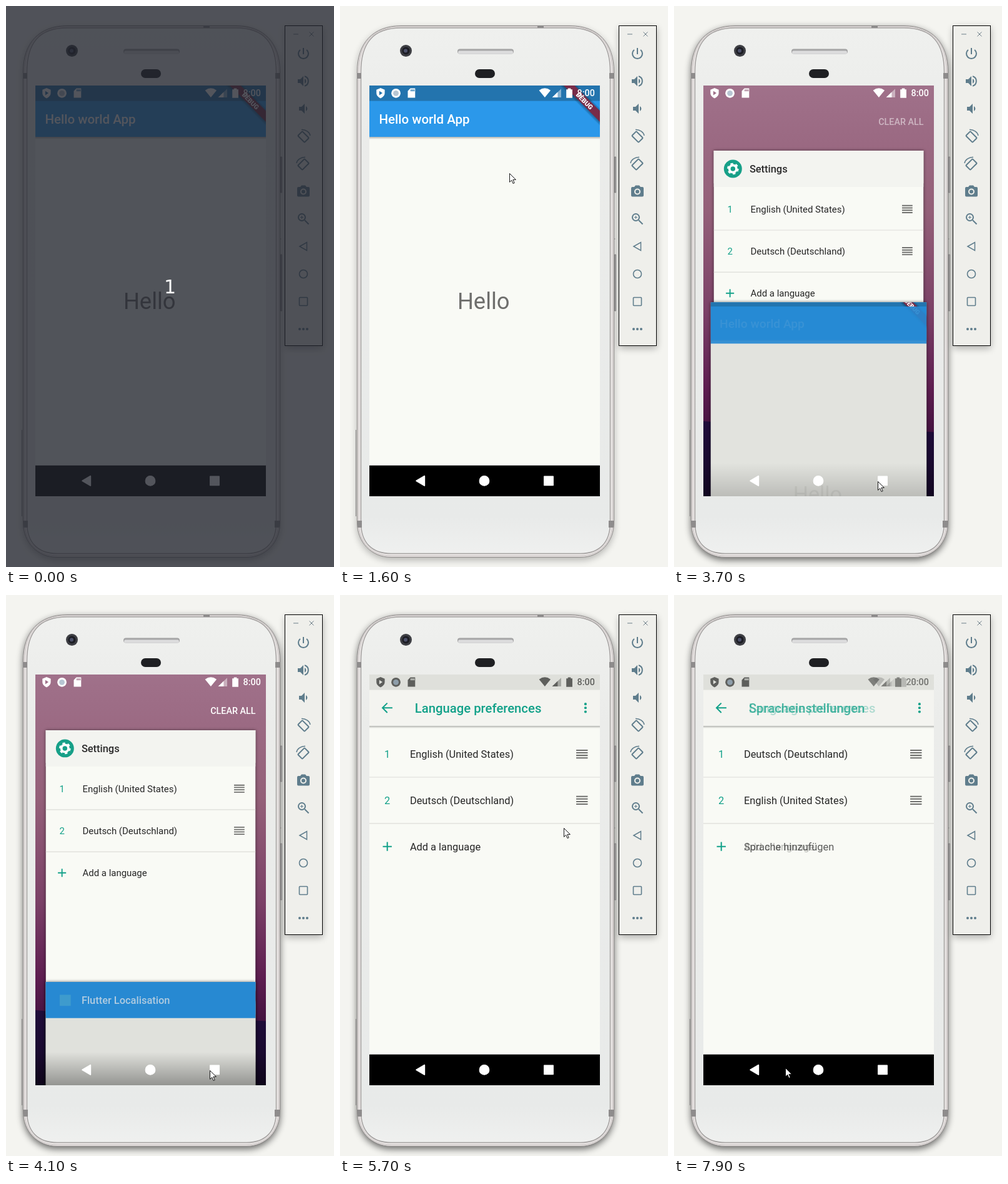
Recreate the animation shown at these times as an HTML page. Size 525 by 896 pixels, loop 8 s.

```html
<!DOCTYPE html>
<html lang="en">
<head>
<meta charset="utf-8">
<title>Hello world App</title>
<style>
  html, body { margin: 0; width: 100%; height: 100%; overflow: hidden; background: #f4f4f0; }
  svg { display: block; }
  text { font-family: Roboto, "Noto Sans", sans-serif; }
  .line { fill: none; stroke-width: 2; }
  .medium { font-weight: 500; }
  .teal { fill: #12a189; }
  .title { font-size: 19.8px; }
  .row { font-size: 16px; fill: #262626; }
  .row .num { fill: #12a189; text-anchor: middle; }
  .card-title { font-size: 17.6px; font-weight: 500; }
</style>
</head>
<body>
<svg width="525" height="896" viewBox="0 0 525 896">
  <defs>
    <filter id="blur3" x="-20%" y="-20%" width="140%" height="140%"><feGaussianBlur stdDeviation="3"/></filter>
    <filter id="blur6" x="-30%" y="-10%" width="160%" height="120%"><feGaussianBlur stdDeviation="6"/></filter>
    <linearGradient id="face" x2="0" y2="1">
      <stop stop-color="#eff0ee"/><stop offset=".2" stop-color="#ebecea"/>
      <stop offset=".93" stop-color="#e8eae9"/><stop offset="1" stop-color="#eff0ef"/>
    </linearGradient>
    <linearGradient id="sky" x2="0" y2="1">
      <stop stop-color="#a0718a"/><stop offset=".3" stop-color="#946079"/>
      <stop offset=".55" stop-color="#7b4167"/><stop offset=".74" stop-color="#5d1d50"/>
      <stop offset=".85" stop-color="#43123f"/>
    </linearGradient>
    <linearGradient id="hill" x2="0" y2="1">
      <stop stop-color="#1f0c3b"/><stop offset="1" stop-color="#150827"/>
    </linearGradient>
    <linearGradient id="fade" x2="0" y2="1">
      <stop stop-opacity="0"/><stop offset="1" stop-opacity=".34"/>
    </linearGradient>
    <linearGradient id="drop" x2="0" y2="1">
      <stop stop-opacity=".28"/><stop offset="1" stop-opacity="0"/>
    </linearGradient>
    <clipPath id="screenClip"><rect width="360" height="640"/></clipPath>
    <clipPath id="helloClip"><rect id="helloCut" width="360" height="640"/></clipPath>
    <clipPath id="prefsClip"><rect id="prefsCut" width="360" height="640"/></clipPath>
    <g id="handle" fill="#727270">
      <path d="M323-7h18v2h-18zM323-3h18v2h-18zM323 1h18v2h-18zM323 5h18v2h-18z"/>
    </g>
    <g id="radio">
      <path d="M265 7.500q9-6.500 18 0L274 18.500z"/>
      <path d="M285.500 18.500L299.500 5v13.500z" opacity=".45"/>
      <path d="M285.500 18.500L294 10.300v8.200z"/>
      <path d="M307.500 6.200h2.500v-1.700h4.500v1.700h2.500v13h-9.500z"/>
    </g>
  </defs>

  <rect width="525" height="896" fill="#f4f4f0"/>

  <!-- phone -->
  <path class="shell" data-inset="0" id="shade" transform="translate(0 4)" filter="url(#blur6)"/>
  <g fill="#c9c7c6" stroke="#8c8a89">
    <path d="M25.500 677V815M439.500 241h2v57h-2zM439.500 397h2v90h-2z" fill="#aaa" stroke="#858383"/>
    <path d="M438.500 372h2M438.500 797v18"/>
    <path class="shell" data-inset="0" fill="#e5e0df" stroke="#8d8a89"/>
    <path class="shell" data-inset="2.500" fill="#ece8e7" stroke="#c6c1c0"/>
    <path class="shell" data-inset="6" fill="url(#face)" stroke="#a5a2a1" stroke-width="1.500"/>
  </g>
  <path d="M27 107h7v9h-7zM431 107h8v9h-8zM28 822h7v11h-7zM430 822h8v11h-8zM316 31h10v4h-10z" fill="#8e8c8c"/>
  <circle cx="105.500" cy="71.500" r="9.500" fill="#3d3e43"/>
  <circle cx="105.500" cy="71.500" r="6" fill="#1c1d24"/>
  <circle cx="105" cy="71.500" r="3" fill="#4c5068"/>
  <rect x="188" y="68.500" width="90" height="8" rx="4" fill="#a5a5a6"/>
  <rect x="189" y="71.500" width="88" height="5" rx="2.500" fill="#dcdcdd"/>
  <rect x="216" y="101" width="32" height="14" rx="7" fill="#1f2023"/>

  <!-- screen, drawn on a 360 x 640 grid -->
  <g transform="translate(47 127) scale(1.025)"><g clip-path="url(#screenClip)">
    <rect width="360" height="640" fill="url(#sky)"/>
    <path d="M0 523l60 5 120 24 130-15 50 3v100H0z" fill="url(#hill)"/>
    <text id="clear" class="medium" x="344" y="61" text-anchor="end" font-size="14" fill="#fff">CLEAR ALL</text>

    <g id="prefs">
      <rect id="prefsShade" width="360" height="640" opacity=".5" filter="url(#blur3)"/>
      <g clip-path="url(#prefsClip)">
        <rect width="360" height="640" fill="#f9faf5"/>
        <g class="row" id="english">
          <text class="num" x="28" y="5.800" id="englishNum">1</text>
          <text x="63.300" y="5.800">English (United States)</text>
          <use href="#handle"/>
          <path d="M0 36h360" stroke="#deded9" stroke-width="1.200"/>
        </g>
        <g class="row" transform="translate(0 268)">
          <path d="M21 0h14M28-7v14" class="line" stroke="#12a189"/>
          <text x="63.300" y="5.800" id="addEn">Add a language</text>
          <text x="63.300" y="5.800" id="addDe">Sprache hinzufügen</text>
        </g>
        <g class="row" id="deutsch">
          <g id="lift">
            <rect y="-35" width="360" height="73" opacity=".36" filter="url(#blur3)"/>
            <rect y="-36" width="360" height="72" fill="#f9faf5"/>
          </g>
          <text class="num" x="28" y="5.800" id="deutschNum">2</text>
          <text x="63.300" y="5.800">Deutsch (Deutschland)</text>
          <use href="#handle"/>
          <path d="M0 36h360" stroke="#deded9" stroke-width="1.200"/>
        </g>
        <rect y="80" width="360" height="4" fill="url(#drop)"/>
        <rect width="360" height="80" fill="#f4f4f0"/>
        <rect width="360" height="24" fill="#dfe0db"/>
        <path d="M36 52H21M28 44.500L20.500 52 28 59.500" class="line" stroke="#12a189"/>
        <g class="teal">
          <circle cx="337.500" cy="46" r="2"/><circle cx="337.500" cy="52" r="2"/><circle cx="337.500" cy="58" r="2"/>
          <text class="title medium" x="71" y="59.500" id="titleEn">Language preferences</text>
          <text class="title medium" x="71" y="59.500" id="titleDe">Spracheinstellungen</text>
        </g>
        <rect y="592" width="360" height="48"/>
        <g id="prefsHead">
          <rect y="24" width="360" height="62" fill="#f3f4f0"/>
          <circle cx="33" cy="55" r="15.500" fill="#17a088"/>
          <g transform="translate(33 55)" fill="none" stroke="#fff">
            <circle r="6" stroke-width="4"/>
            <circle r="8.700" stroke-width="2.600" stroke-dasharray="4.555"/>
          </g>
          <text class="card-title" x="61.500" y="62" fill="#2c2c2c">Settings</text>
        </g>
      </g>
    </g>

    <g id="hello">
      <rect id="helloShade" width="360" height="640" opacity=".55" filter="url(#blur3)"/>
      <g clip-path="url(#helloClip)">
        <rect width="360" height="640" fill="#f9faf5"/>
        <rect y="80" width="360" height="4" fill="url(#drop)"/>
        <rect width="360" height="80" fill="#2b98ea"/>
        <rect width="360" height="24" fill="#2374ae"/>
        <text class="medium" x="15" y="59.500" font-size="20" fill="#fff">Hello world App</text>
        <text x="178.300" y="348.300" font-size="35.500" text-anchor="middle" fill="#6e6e6c">Hello</text>
        <g transform="translate(360 0) rotate(45)">
          <rect x="-48" y="28" width="96" height="13" opacity=".5" filter="url(#blur3)"/>
          <rect x="-48" y="28" width="96" height="12" fill="#782c49"/>
          <text y="37.700" font-size="10.200" font-weight="900" text-anchor="middle" fill="#fff">DEBUG</text>
        </g>
        <rect y="592" width="360" height="48"/>
        <g id="helloHead">
          <rect y="24" width="360" height="62" fill="#2b98ea"/>
          <rect y="86" width="360" height="554" fill="#f9faf5"/>
          <g id="helloLabel">
            <rect x="24" y="46" width="19" height="19" fill="#4fb6e3"/>
            <text class="card-title" x="61.500" y="62" fill="#fff">Flutter Localisation</text>
          </g>
          <rect y="24" width="360" height="616" opacity=".1"/>
        </g>
      </g>
    </g>

    <rect id="scrim" y="588" width="360" height="52" fill="url(#fade)"/>
    <g id="status">
      <path d="M17.500 4l6.500 2.500v5c0 4-3 7-6.500 8.500C14 18.500 11 15.500 11 11.500v-5zM15.500 8.500v6.500l5-3.200z" fill-rule="evenodd"/>
      <circle cx="41.500" cy="12" r="7.200"/>
      <circle cx="41.500" cy="12" r="4.300" fill="#9fb3c4" opacity=".75"/>
      <path d="M64 4.500h7.500v14.500h-11.500v-10.500zM64.500 6v3h1.400v-3zM66.800 6v3h1.400v-3zM69 6v3h1.400v-3z" fill-rule="evenodd"/>
      <use id="radioOld" href="#radio"/>
      <use id="radioNew" href="#radio" x="-8"/>
      <g class="medium" font-size="14" text-anchor="end">
        <text id="clockOld" x="352" y="17">8:00</text>
        <text id="clockNew" x="352" y="17">20:00</text>
      </g>
    </g>
    <g fill="#fff" stroke="#fff" stroke-linejoin="round">
      <path d="M73.500 616l12.500-7.300v14.600z" stroke-width="2"/>
      <circle cx="179.500" cy="616" r="7.700"/>
      <rect x="273" y="609" width="14" height="14" stroke-width="1.500"/>
    </g>
  </g></g>

  <!-- emulator tool panel -->
  <rect x="447" y="35" width="60" height="512" opacity=".28" filter="url(#blur6)"/>
  <rect x="446.500" y="31.500" width="60" height="511" fill="#efefeb" stroke="#000"/>
  <path d="M460 45h8M485.500 41.500l7 7M492.500 41.500l-7 7" stroke="#6d7e88" fill="none"/>
  <g id="tools" fill="#5f7d8c" stroke="#5f7d8c" stroke-width="0">
    <g><path class="line" d="M0-9v10M-5.100-6.100a8 8 0 1 0 10.200 0"/></g>
    <g><path d="M-9-3v6h4l5 5V-8l-5 5zM2-4v8a4.500 4.500 0 0 0 0-8z"/><path class="line" d="M2-7.700a8 8 0 0 1 0 15.400"/></g>
    <g><path d="M-7-3v6h4l5 5V-8l-5 5zM4-4v8a4.500 4.500 0 0 0 0-8z"/></g>
    <g><g id="turn"><rect class="line" x="-7.500" y="-5" width="15" height="10" rx="1" transform="translate(0 1) rotate(45)"/><path class="line" d="M-3-10.500C4-11 10-6 11-1" style="stroke-width:1.500"/></g></g>
    <g><use href="#turn" transform="scale(-1 1)"/></g>
    <g><path d="M-8-7h3l2-2.500h6l2 2.500h3a2 2 0 0 1 2 2v11.500a2 2 0 0 1-2 2H-8a2 2 0 0 1-2-2V-5a2 2 0 0 1 2-2z"/><circle class="line" cy=".5" r="4" stroke="#efefeb"/></g>
    <g><circle class="line" cx="-2.500" cy="-2.500" r="5.500"/><path class="line" d="M2 2l6.500 6.500"/><path class="line" d="M-5-2.500h5M-2.500-5v5" style="stroke-width:1"/></g>
    <g><path class="line" d="M-6 0L5.500-6.500v13z" style="stroke-width:1.500"/></g>
    <g><circle class="line" r="6.500" style="stroke-width:1.600"/></g>
    <g><rect class="line" x="-6.500" y="-6.500" width="13" height="13" rx="1" style="stroke-width:1.600"/></g>
    <g><circle cx="-6" r="2"/><circle r="2"/><circle cx="6" r="2"/></g>
  </g>

  <path id="cursor" d="M.5.500V14.300l3.200-3.100 2.300 5.300 2.200-.9-2.300-5.200h4.500z" fill="#fff" stroke="#000" stroke-width=".9"/>

  <g id="countdown">
    <rect width="525" height="896" fill="#23262f" opacity=".78"/>
    <text x="262.500" y="459" text-anchor="middle" font-size="30" fill="#fff" style="font-family:'DejaVu Sans',sans-serif">1</text>
  </g>
</svg>

<script>
const LOOP = 8000, STEP = 100;
const $ = id => document.getElementById(id);
const set = (id, name, value) => $(id).setAttribute(name, value);
const alpha = (id, value) => set(id, "opacity", value);

// Piecewise linear value through [time, value] points
function track(t, points) {
  if (t <= points[0][0]) return points[0][1];
  for (let i = 1; i < points.length; i++) {
    const [t0, a] = points[i - 1], [t1, b] = points[i];
    if (t < t1) return a + (b - a) * (t - t0) / (t1 - t0);
  }
  return points[points.length - 1][1];
}

// Phone outline, moved inwards by i pixels
function shell(i) {
  const l = 27.5 + i, r = 438.5 - i, t = 31.5 + i * .6, b = 880.5 - i;
  return `M${l} 105C${l} 60 52 ${t} 98 ${t}H368C414 ${t} ${r} 60 ${r} 105` +
    `V825C${r} 856 416 ${b} 385 ${b}H82C50 ${b} ${l} 856 ${l} 825Z`;
}

// Window between its card (open = 0) and full screen (open = 1)
function placeWindow(id, open, cardTop) {
  const scale = .9106 + .0894 * open, cut = 24 * (1 - open);
  const x = 180 * (1 - scale), y = cardTop * (1 - open) - scale * cut;
  set(id, "transform", `translate(${x} ${y}) scale(${scale})`);
  set(id + "Cut", "y", cut);
  set(id + "Shade", "y", cut);
}

const pointer = [
  [900, 164, 5], [1100, 205, 95], [1250, 262, 205], [1400, 285, 253], [1500, 285, 253],
  [1700, 256, 280], [2000, 256, 280], [2200, 210, 370], [2400, 167, 510], [2600, 235, 670],
  [2800, 326, 759], [4200, 326, 759], [4450, 318, 610], [4700, 293, 453], [5300, 293, 453],
  [5600, 345, 390], [5900, 383, 335], [6000, 384, 324], [6100, 384, 324], [6500, 380, 264],
  [6800, 377, 250], [7200, 377, 250], [7500, 300, 450], [7900, 178, 755]
];
const helloOpen = [[3300, 1], [3400, .96], [3600, .45], [3800, .14], [4100, 0]];
const prefsOpen = [[5000, 0], [5100, .53], [5200, .8], [5300, .92], [5500, 1]];

function render(t) {
  const recents = t >= 3400 && t < 5100;
  alpha("countdown", t < 500 ? 1 : 0);
  alpha("shade", t < 3200 ? .28 : .6);

  alpha("cursor", t < 900 ? 0 : 1);
  const x = track(t, pointer.map(p => [p[0], p[1]]));
  const y = track(t, pointer.map(p => [p[0], p[2]]));
  set("cursor", "transform", `translate(${Math.round(x)} ${Math.round(y)})`);

  const hello = track(t, helloOpen);
  placeWindow("hello", hello, 479);
  alpha("hello", t < 5100 ? 1 : 0);
  alpha("helloHead", Math.min(1, (1 - hello) * 1.3));
  alpha("helloLabel", track(t, [[3800, 0], [4100, .72], [4300, 1]]));

  const prefs = track(t, prefsOpen);
  placeWindow("prefs", prefs, track(t, [[3400, 130], [3800, 92], [4100, 86.8]]));
  alpha("prefs", track(t, [[3400, 0], [3700, 1]]));
  alpha("prefsHead", Math.max(0, 1 - prefs * 1.6));

  const shown = recents ? track(t, [[3500, 0], [3900, 1]]) : 0;
  alpha("clear", shown);
  alpha("scrim", shown);

  // Dragging the second row above the first
  const up = track(t, [[6100, 0], [6200, -11], [6500, -53.6], [6700, -68], [6900, -72]]);
  const down = track(t, [[6400, 0], [6500, 14], [6700, 72]]);
  set("deutsch", "transform", `translate(0 ${196 + up})`);
  set("english", "transform", `translate(0 ${124 + down})`);
  alpha("lift", track(t, [[6100, 0], [6200, 1], [6800, 1], [7000, 0]]));
  $("deutschNum").textContent = t < 6900 ? 2 : 1;
  $("englishNum").textContent = t < 6900 ? 1 : 2;

  // Switch of the system language
  const german = t >= 7900;
  for (const id of ["titleEn", "addEn", "radioOld", "clockOld"]) alpha(id, german ? .3 : 1);
  for (const id of ["titleDe", "addDe", "radioNew", "clockNew"]) alpha(id, german ? .75 : 0);
  set("status", "fill", t < 5400 ? "#fff" : "#5e5f5c");
}

document.querySelectorAll(".shell").forEach(p => p.setAttribute("d", shell(+p.dataset.inset)));
[...$("tools").children].forEach((g, i) => {
  g.setAttribute("transform", `translate(476 ${76 + 44 * i})`);
});

const start = performance.now();
function frame() {
  const t = Math.max(0, performance.now() - start) % LOOP;
  render(Math.floor(t / STEP) * STEP);
  requestAnimationFrame(frame);
}
frame();
</script>
</body>
</html>
```
